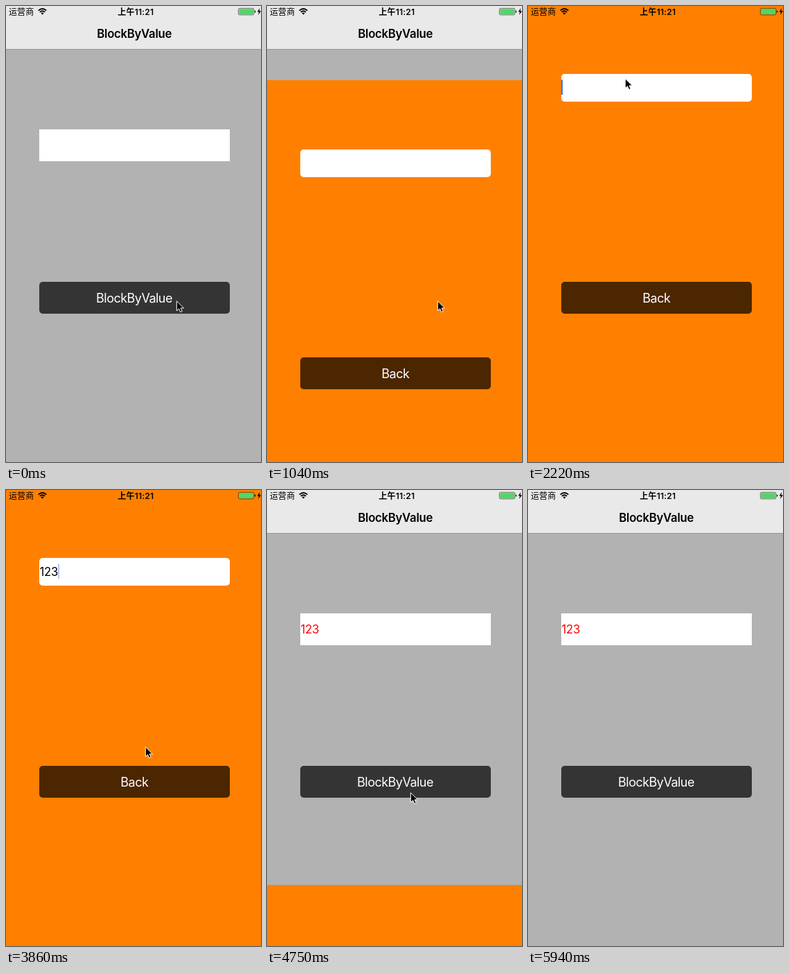
These frames come from a looping animation (368x658 px, 6.04 s). An HTML page:

```html
<!DOCTYPE html>
<html lang="zh-CN">
<head>
<meta charset="utf-8">
<title>BlockByValue</title>
<style>
html, body { margin: 0; width: 100%; height: 100%; overflow: hidden; }
svg { display: block; width: 368px; height: 658px; background: #b2b2b2; }
text { font: 16.7px Inter, "Noto Sans CJK SC", "Noto Sans CJK", sans-serif; letter-spacing: -.15px; }
.title { font-weight: 600; letter-spacing: -.25px; text-anchor: middle; }
.button { font-size: 18px; letter-spacing: -.52px; fill: #fff; text-anchor: middle; }
.status { font-size: 12px; letter-spacing: .1px; }
.clock { font-weight: 600; letter-spacing: .2px; text-anchor: middle; }
</style>
</head>
<body>
<svg viewBox="0 0 368 658">
  <g>
    <rect width="368" height="62" fill="#e9e9e9"/>
    <rect y="62" width="368" height="1" fill="#989898"/>
    <text class="title" x="185.2" y="46">BlockByValue</text>
    <rect x="48" y="178" width="275" height="46" fill="#fff"/>
    <text id="result" x="48.4" y="207.3" fill="#f00"></text>
    <rect x="48" y="398" width="275" height="46" rx="5" fill="#343434"/>
    <text class="button" x="185" y="427.5">BlockByValue</text>
  </g>
  <g id="sheet">
    <rect y="-2" width="368" height="662" fill="#ff8000"/>
    <rect x="48" y="98" width="275" height="40" rx="5" fill="#fff"/>
    <text id="typed" x="48.4" y="124"></text>
    <rect id="caret" y="106.5" width="2" height="21.5" fill="#426bf2"/>
    <rect x="48" y="398" width="275" height="46" rx="5" fill="#4b2600"/>
    <text class="button" x="185.3" y="427.5">Back</text>
  </g>
  <g>
    <text class="status" x="4" y="12.8">运营商</text>
    <g fill="none" stroke="#000" stroke-width="1.9">
      <path d="M46.7 6.6Q52.5 1.4 58.3 6.6M48.9 8.9Q52.5 5.6 56.1 8.9"/>
      <path d="M50.4 10.4Q52.5 8.6 54.6 10.4L52.5 12.6Z" fill="#000" stroke="none"/>
    </g>
    <text class="status clock" x="187.3" y="12.6">上午11:21</text>
    <rect x="335.3" y="3.3" width="22.6" height="9.6" rx="2" fill="none" stroke="#222" stroke-width=".6"/>
    <rect x="336.2" y="4.2" width="20.8" height="7.8" rx="1" fill="#4cd964"/>
    <path d="M358.8 6.2q1.4 .4 1.4 1.8t-1.4 1.8Z"/>
    <path d="M366.2 3L362.6 8.6H365L363.9 13L368 7.2H365.5Z"/>
  </g>
  <path id="mouse" d="M.3 .8V14.8L3.6 11.8L5.7 16.6L8.2 15.5L6.1 10.9H10.5Z" stroke="#fff"/>
</svg>
<script>
const LOOP = 6040, FIRST = 885, BEAT = 148.2;  // the screen refreshes once per beat
const HIDDEN = 662;                            // sheet offset when off screen
const OPEN = 1, TAP = 9, IDLE = 19, CLOSE = 26, LEAVE = 30;
const KEYS = [13, 16, 17];                     // beats at which a digit is typed

const $ = id => document.getElementById(id);
const clamp = v => Math.min(1, Math.max(0, v));

// Pointer stops: [beat, x, y]
const stops = [[0, 246, 425], [4, 246, 425], [9, 140, 104], [18, 140, 104],
  [21, 201, 370], [23, 207, 436], [LEAVE, 207, 436], [35, 345, 680]];

function pointer(beat) {
  const i = Math.max(1, stops.findIndex(s => s[0] >= beat));
  const [a, b] = [stops[i - 1], stops[i]];
  const p = clamp((beat - a[0]) / (b[0] - a[0]));
  return [1, 2].map(k => a[k] + (b[k] - a[k]) * p);
}

// Critically damped spring: distance left, from 1 to 0
const spring = x => (1 + x) * Math.exp(-x);

function sheetTop(beat) {
  if (beat < OPEN) return HIDDEN;
  if (beat < CLOSE) return HIDDEN * spring(.5 + 2.75 * (beat - OPEN));
  return HIDDEN * (1 - spring(.58 + 2.92 * (beat - CLOSE)));
}

// Fades in on tap, then blinks once typing has stopped
function caretAlpha(beat) {
  if (beat < IDLE) return clamp((beat - TAP + 1) / 2);
  return clamp(.5 + Math.cos((beat - IDLE) * 2 * Math.PI / 7.5));
}

function draw(time) {
  const beat = Math.max(0, Math.floor((time % LOOP - FIRST) / BEAT) + 1);
  const text = "123".slice(0, KEYS.filter(k => k <= beat).length);
  $("typed").textContent = text;
  $("result").textContent = beat >= CLOSE ? text : "";
  $("sheet").setAttribute("transform", `translate(0 ${Math.round(sheetTop(beat))})`);
  $("caret").setAttribute("x", 48 + Math.round(text && $("typed").getComputedTextLength()));
  $("caret").setAttribute("opacity", caretAlpha(beat));
  $("mouse").setAttribute("transform", `translate(${pointer(beat)})`);
}

const start = performance.now();
function frame() {
  draw(performance.now() - start);
  requestAnimationFrame(frame);
}
frame();
</script>
</body>
</html>
```
